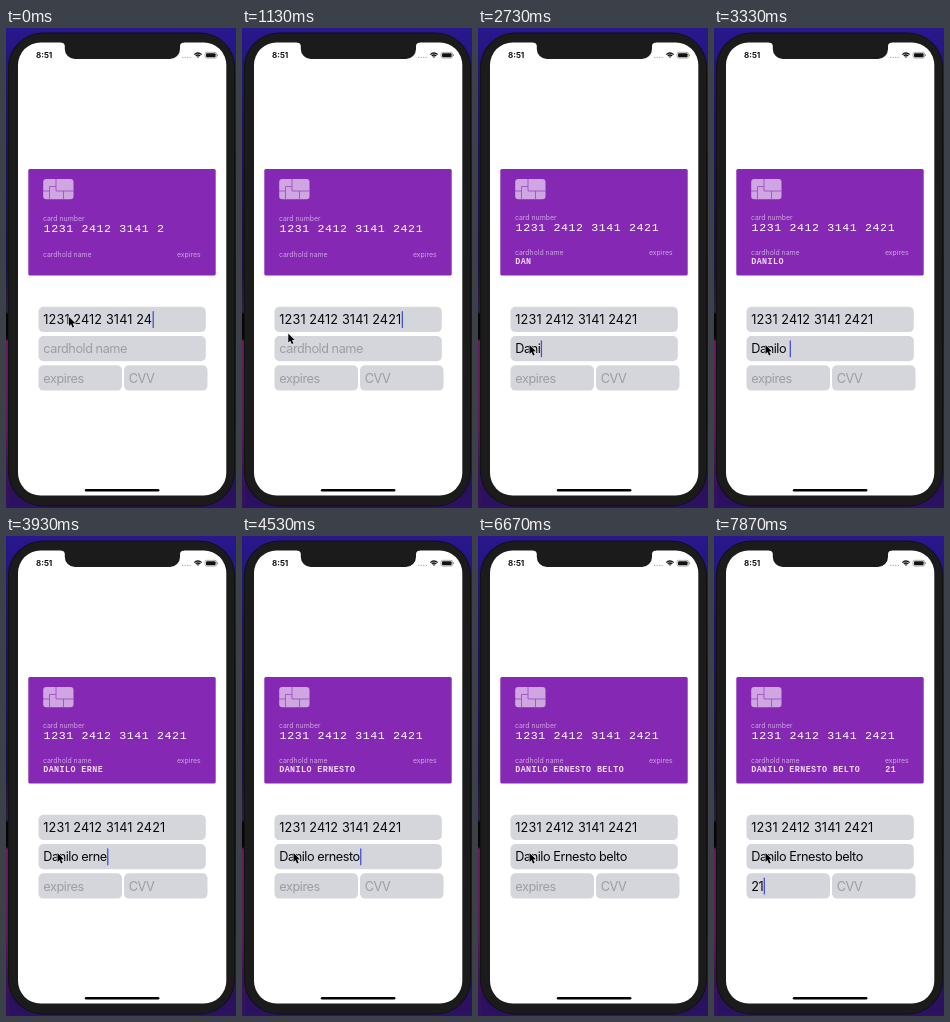
Write an HTML page with a canvas that moves like this. It is 230 px wide and 480 px high and loops after 8000 ms.

```html
<!DOCTYPE html>
<html lang="en">
<head>
<meta charset="utf-8">
<title>Card form</title>
<style>
  html, body { margin: 0; width: 100%; height: 100%; overflow: hidden; background: #000; }
  canvas { display: block; width: 230px; height: 480px; }
</style>
</head>
<body>
<canvas id="stage"></canvas>
<script>
const W = 230, H = 480, LOOP = 8000, CARD_LAG = 120;
const canvas = document.getElementById('stage');
const ctx = canvas.getContext('2d');
const ratio = window.devicePixelRatio || 1;
canvas.width = W * ratio;
canvas.height = H * ratio;

const SANS = 'Inter, Roboto, sans-serif';
const MONO = '"Liberation Mono", monospace';
const PURPLE = '#8528b4', BODY = '#1b1b1c', INK = '#08080a', HINT = '#9d9da4', LILAC = '#cda5e1';
const NUMBER = '1231 2412 3141 2421';
const NAME = 'Danilo Ernesto belto';
const NAME_KEYS = [2270, 2400, 2530, 2670, 2870, 3000, 3200, 3400, 3530, 3670,
  3800, 4000, 4130, 4270, 4560, 4870, 5070, 5400, 5600, 5800];
const EXPIRY_KEYS = [7530, 7730];
// start of fade-out, its length, start of fade-in, its length
const BLINKS = [[800, 130, 950, 120], [1630, 60, 1850, 150], [6380, 280, 6910, 130]];
const MOUSE = [[0, 63, 289], [780, 63, 289], [1100, 46, 305], [1320, 51.5, 317], [LOOP, 51.5, 317]];

const clamp = v => Math.min(1, Math.max(0, v));
const ease = v => v * v * (3 - 2 * v);
const pressed = (keys, t) => keys.filter(k => k <= t).length;

function box(x, y, w, h, r, fill) {
  ctx.beginPath();
  ctx.roundRect(x, y, w, h, r);
  ctx.fillStyle = fill;
  ctx.fill();
}

function label(text, x, y, font, color, spacing = 0) {
  ctx.font = font;
  ctx.letterSpacing = spacing + 'px';
  ctx.fillStyle = color;
  ctx.fillText(text, x, y);
  return ctx.measureText(text).width;
}

function vertical(stops) {
  const g = ctx.createLinearGradient(0, 0, 0, H);
  stops.forEach(([at, color]) => g.addColorStop(at / H, color));
  return g;
}

function drawBackdrop() {
  ctx.fillStyle = vertical([[0, '#28188c'], [60, '#21137a'], [150, '#1a0f58'], [290, '#190e46'],
    [400, '#231052'], [480, '#2b1262']]);
  ctx.fillRect(0, 0, W, H);
  ctx.fillStyle = vertical([[0, '#28188c'], [80, '#1f1268'], [240, '#1a1040'], [284, '#2a2040'],
    [286, '#050508'], [311, '#050508'], [313, '#641c5c'], [400, '#5c1a58'], [440, '#3c1256'], [480, '#321260']]);
  ctx.fillRect(0, 0, 3, H);
}

function drawNotch() {
  ctx.beginPath();
  ctx.moveTo(55, 13);
  ctx.lineTo(55, 14.5);
  ctx.quadraticCurveTo(58.5, 14.5, 58.8, 18);
  ctx.lineTo(58.8, 21);
  ctx.arcTo(58.8, 31, 69, 31, 10);
  ctx.lineTo(164, 31);
  ctx.arcTo(174, 31, 174, 21, 10);
  ctx.lineTo(174, 18);
  ctx.quadraticCurveTo(174.3, 14.5, 178, 14.5);
  ctx.lineTo(178, 13);
  ctx.fillStyle = BODY;
  ctx.fill();
}

function drawPhone() {
  box(2, 4.5, 227, 474, 35, '#111112');
  box(3, 5.5, 225, 472, 34, BODY);
  box(12, 14.5, 208.3, 453, 22.5, '#fff');
  drawNotch();
  box(78.8, 460.9, 74.6, 2.7, 1.35, '#000');
}

function drawStatus() {
  label('8:51', 30, 30.2, '700 8px ' + SANS, '#111');
  for (let i = 0; i < 4; i++) box(176 + i * 2.5, 28.7, 1.4, 1.3, 0.6, '#b0b0b3');
  ctx.strokeStyle = '#111';
  ctx.lineWidth = 1.3;
  for (const r of [1, 3, 5]) {
    ctx.beginPath();
    ctx.arc(192, 30, r, -Math.PI * 0.76, -Math.PI * 0.24);
    ctx.stroke();
  }
  ctx.lineWidth = 0.6;
  ctx.strokeStyle = '#777';
  ctx.beginPath();
  ctx.roundRect(199, 24.3, 11.6, 5.8, 1.7);
  ctx.stroke();
  box(200, 25.2, 9.6, 4, 1, '#111');
  box(211.2, 26.2, 0.8, 2, 0.4, '#777');
}

function drawChip() {
  box(37.2, 151, 30.3, 20.3, 3, '#cfa5e2');
  ctx.strokeStyle = '#9848c0';
  ctx.lineWidth = 0.8;
  ctx.beginPath();
  ctx.moveTo(37, 163); ctx.lineTo(43.5, 163);
  ctx.moveTo(43.5, 171); ctx.lineTo(43.5, 158.5); ctx.lineTo(50, 158.5);
  ctx.moveTo(50, 151); ctx.lineTo(50, 163); ctx.lineTo(67.5, 163);
  ctx.moveTo(57.5, 163); ctx.lineTo(57.5, 171);
  ctx.stroke();
}

function drawCard(number, name, expiry) {
  const lift = name ? 1 : 0;
  const small = '6.9px ' + SANS;
  const value = 'bold 8.4px ' + MONO;
  box(22.3, 141, 187.4, 106.4, 1.5, PURPLE);
  drawChip();
  label('card number', 37, 192.6 - lift, small, LILAC);
  label(number, 37.6, 204 - lift, '11.6px ' + MONO, '#fff', 0.6);
  label('cardhold name', 37, 228.8 - lift * 2, small, LILAC);
  label('expires', 171, 228.8 - lift * 2, small, LILAC);
  label(name.toUpperCase(), 37.2, 235.8, value, '#eedcf6', 0.42);
  label(expiry, 171.2, 235.8, value, '#eedcf6', 0.42);
}

function drawField(x, y, w, text, hint, caret, spacing = -0.45) {
  box(x, y, w, 25.3, 5, '#d5d6dc');
  const width = label(text || hint, x + 4.8, y + 17.2, '12.7px ' + SANS, text ? INK : HINT, spacing);
  if (caret > 0) {
    ctx.globalAlpha = caret;
    box(x + 5.2 + (text ? width : 0), y + 4.3, 1.3, 17, 0.6, '#4650d8');
    ctx.globalAlpha = 1;
  }
}

function caretAlpha(t) {
  return BLINKS.reduce((a, [out, outFor, back, backFor]) =>
    a * (1 - clamp((t - out) / outFor) + clamp((t - back) / backFor)), 1);
}

function drawMouse(t) {
  const i = Math.max(1, MOUSE.findIndex(p => p[0] > t));
  const [t0, x0, y0] = MOUSE[i - 1], [t1, x1, y1] = MOUSE[i];
  const k = ease(clamp((t - t0) / (t1 - t0)));
  ctx.save();
  ctx.translate(x0 + (x1 - x0) * k, y0 + (y1 - y0) * k);
  ctx.scale(0.93, 0.93);
  ctx.beginPath();
  [[0, 0], [0, 9.6], [2.2, 7.6], [3.8, 11.2], [5.5, 10.4], [3.9, 6.9], [6.8, 6.7]]
    .forEach(([x, y]) => ctx.lineTo(x, y));
  ctx.closePath();
  ctx.lineJoin = 'round';
  ctx.lineWidth = 1.2;
  ctx.strokeStyle = '#e8e8ec';
  ctx.stroke();
  ctx.fillStyle = '#000';
  ctx.fill();
  ctx.restore();
}

function typedName(t) {
  const count = pressed(NAME_KEYS, t);
  const text = NAME.slice(0, count);
  // the second word gets its capital once the space is typed
  return count < 15 ? text.slice(0, 7) + text.slice(7).toLowerCase() : text;
}

function draw(t) {
  ctx.setTransform(ratio, 0, 0, ratio, 0, 0);
  const number = NUMBER.slice(0, 17 + pressed([130, 200], t));
  const cardNumber = NUMBER.slice(0, 16 + pressed([70, 200, 330], t));
  const expiry = '21'.slice(0, pressed(EXPIRY_KEYS, t));
  const cardExpiry = '21'.slice(0, pressed(EXPIRY_KEYS, t - CARD_LAG));
  const focus = pressed([1270, 7090], t);
  const caret = i => focus === i ? caretAlpha(t) : 0;

  drawBackdrop();
  drawPhone();
  drawStatus();
  drawCard(cardNumber, typedName(t - CARD_LAG), cardExpiry);
  drawField(32.5, 278.8, 167.3, number, '', caret(0), 0.12);
  drawField(32.5, 308, 167.3, typedName(t), 'cardhold name', caret(1));
  drawField(32.5, 337.3, 83.5, expiry, 'expires', caret(2));
  drawField(118, 337.3, 83.5, '', 'CVV', 0);
  drawMouse(t);
}

const start = performance.now();
function tick() {
  draw((performance.now() - start) % LOOP);
  requestAnimationFrame(tick);
}
tick();
</script>
</body>
</html>
```
